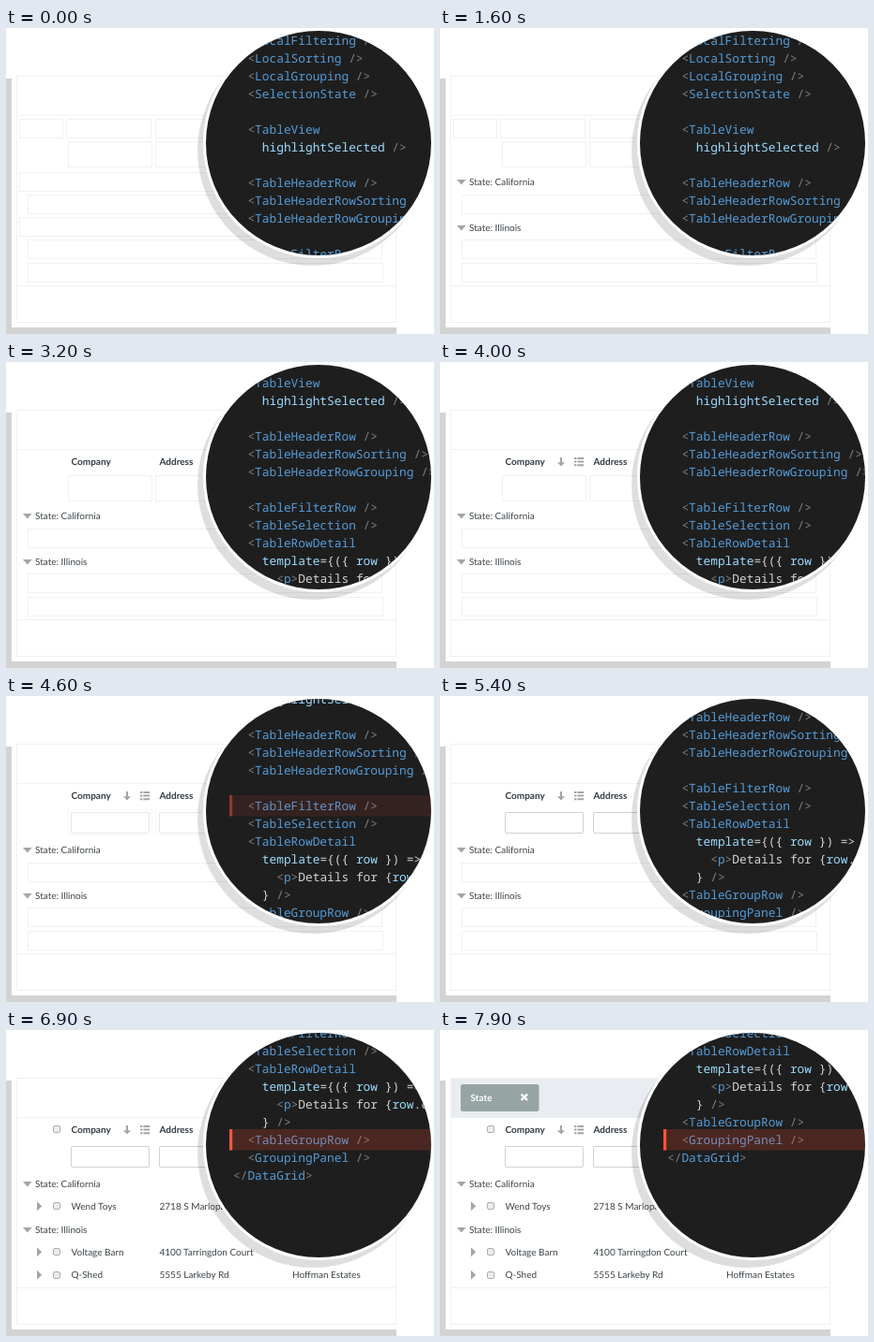
Write an HTML page that moves like this. It is 456x327 px and loops after 8 s.

```html
<!DOCTYPE html>
<html lang="en">
<head>
<meta charset="utf-8">
<title>Data grid features</title>
<style>
  html, body { margin: 0; width: 100%; height: 100%; overflow: hidden; background: #fff; }
  svg { display: block; }
  text { text-rendering: geometricPrecision; white-space: pre; }
  .ui text { font: 10px Lato, sans-serif; fill: #3d4449; }
  .ui .bold { font-weight: 700; fill: #333b42; }
  .ui .pill { fill: #fff; }
  .ghost { fill: none; stroke: #f1f1f1; }
  .back { fill: #fff; }
  .input { fill: #fff; stroke: #cfd1d3; }
  .check { fill: #ececec; stroke: #adadad; }
  .mark { fill: #a2a5a7; }
  .code text { font: 12.83px "Noto Sans Mono", monospace; fill: #d4d4d4; }
  .code .p { fill: #808080; }
  .code .t { fill: #569cd6; }
  .code .a { fill: #9cdcfe; }

  .show { animation: 8s step-end infinite; }
  .groups { animation-name: groups; }
  .heads { animation-name: heads; }
  .icons { animation-name: icons; }
  .filters { animation-name: filters; }
  .checks { animation-name: checks; }
  .rows { animation-name: rows; }
  .panel { animation-name: panel; }
  .glow { animation-name: glow; }
  .code { animation: scroll 8s infinite; }

  @keyframes groups { 0% { opacity: 0 } 12.5% { opacity: .5 } 13.75%, 100% { opacity: 1 } }
  @keyframes heads { 0% { opacity: 0 } 27.5% { opacity: .5 } 28.75%, 100% { opacity: 1 } }
  @keyframes icons { 0% { opacity: 0 } 42.5% { opacity: .5 } 43.75%, 100% { opacity: 1 } }
  @keyframes filters { 0% { opacity: 0 } 57.5% { opacity: .5 } 58.75%, 100% { opacity: 1 } }
  @keyframes checks { 0% { opacity: 0 } 70% { opacity: .5 } 71.25%, 100% { opacity: 1 } }
  @keyframes rows { 0% { opacity: 0 } 85% { opacity: .5 } 86.25%, 100% { opacity: 1 } }
  @keyframes panel { 0% { opacity: 0 } 97.5% { opacity: .5 } 98.75%, 100% { opacity: 1 } }

  @keyframes glow {
    0% { opacity: 0; transform: translateY(-9px) }
    12.5% { opacity: .5; transform: translateY(-9px) }
    13.75% { opacity: 1; transform: translateY(-9px) }
    20%, 35%, 50%, 65%, 77.5%, 92.5% { opacity: 0; transform: none }
    27.5%, 42.5%, 57.5%, 70%, 85%, 97.5% { opacity: .5; transform: none }
    28.75%, 43.75%, 58.75%, 71.25%, 86.25%, 98.75%, 100% { opacity: 1; transform: none }
  }

  @keyframes scroll {
    0%, 20% { transform: none; animation-timing-function: steps(4) }
    25%, 35% { transform: translateY(-48px); animation-timing-function: steps(4) }
    40%, 50% { transform: translateY(-86px); animation-timing-function: steps(4) }
    55%, 65% { transform: translateY(-124px); animation-timing-function: steps(2) }
    67.5%, 77.5% { transform: translateY(-143px); animation-timing-function: steps(4) }
    82.5%, 92.5% { transform: translateY(-238px); animation-timing-function: steps(2) }
    95%, 100% { transform: translateY(-257px) }
  }
</style>
</head>
<body>
<svg width="456" height="327" viewBox="0 0 456 327">
  <defs>
    <clipPath id="lens"><circle cx="333" cy="123" r="120"/></clipPath>
    <path id="open" class="mark" d="M18 162h9.6l-4.8 5.4z"/>
    <path id="closed" class="mark" d="M33 183.2v10l5.2-5z"/>
    <rect id="box" class="check" x="50.5" y="184.5" width="7" height="7" rx="1.5"/>
  </defs>

  <!-- card -->
  <path fill="#d3d3d3" d="M0 54h6v266h410v7H0z"/>
  <g class="ghost">
    <rect x="11.5" y="51.5" width="404" height="263"/>
    <path d="M12 93.5h403M12 275.5h403"/>
    <rect x="14.5" y="97.5" width="46" height="20"/>
    <rect x="64.5" y="97.5" width="90" height="20"/>
    <rect x="159.5" y="97.5" width="90" height="20"/>
    <rect x="66.5" y="121.5" width="89" height="27"/>
    <rect x="159.5" y="121.5" width="89" height="27"/>
    <rect x="14.5" y="154.5" width="387" height="20"/>
    <rect x="23.5" y="178.5" width="378" height="20"/>
    <rect x="14.5" y="202.5" width="387" height="20"/>
    <rect x="23.5" y="226.5" width="377" height="20"/>
    <rect x="23.5" y="251.5" width="378" height="20"/>
  </g>

  <g class="ui">
    <g class="show groups">
      <path class="back" d="M13 153h390v23H13zM13 201h390v23H13z"/>
      <use href="#open"/><text x="31" y="168">State: California</text>
      <use href="#open" y="49"/><text x="31" y="217">State: Illinois</text>
    </g>
    <g class="show heads">
      <path class="back" d="M13 96h238v23H13z"/>
      <text class="bold" x="69.5" y="110">Company</text>
      <text class="bold" x="163.5" y="110">Address</text>
    </g>
    <g class="show icons mark">
      <path d="M128 102h2v5.2h3l-4 4.3l-4-4.3h3z"/>
      <path d="M143 102h2.4v2H143zM146.4 102h6.8v2h-6.8zM143 105.6h2.4v2H143zM146.4 105.6h6.8v2h-6.8zM143 109.2h2.4v2H143zM146.4 109.2h6.8v2h-6.8z"/>
    </g>
    <g class="show filters">
      <path class="back" d="M65 120h186v30H65z"/>
      <rect class="input" x="69.5" y="124.5" width="83" height="22" rx="1.5"/>
      <rect class="input" x="163.5" y="124.5" width="83" height="22" rx="1.5"/>
    </g>
    <g class="show rows">
      <path class="back" d="M22 177h381v23H22zM22 225h381v48H22z"/>
      <use href="#closed"/>
      <text x="69.5" y="192">Wend Toys</text>
      <text x="163.5" y="192">2718 S Marlopa</text>
      <use href="#closed" y="49"/>
      <text x="69.5" y="241">Voltage Barn</text>
      <text x="163.5" y="241">4100 Tarringdon Court</text>
      <use href="#closed" y="73.5"/>
      <text x="69.5" y="265">Q-Shed</text>
      <text x="163.5" y="265">5555 Larkeby Rd</text>
      <text x="305" y="265">Hoffman Estates</text>
    </g>
    <g class="show checks">
      <use href="#box" y="-82"/>
      <use href="#box"/>
      <use href="#box" y="49"/>
      <use href="#box" y="74"/>
    </g>
    <g class="show panel">
      <path fill="#e9edf2" d="M12 52h403v42H12z"/>
      <rect x="22" y="58" width="83.5" height="29" rx="2.5" fill="#97a4a4"/>
      <text class="bold pill" x="32.5" y="76">State</text>
      <path d="M86.6 68.6l6.4 6.4m0-6.4l-6.4 6.4" stroke="#fff" stroke-width="2.4"/>
    </g>
  </g>

  <!-- magnifier -->
  <circle cx="327" cy="131" r="123" fill="#000" opacity=".13"/>
  <circle cx="333" cy="123" r="123" fill="#fff"/>
  <g clip-path="url(#lens)">
    <rect x="213" y="3" width="240" height="240" fill="#1e1e1e"/>
    <g class="code" id="code"></g>
    <g class="show glow">
      <rect x="241" y="106" width="212" height="22.5" fill="#ff4d32" opacity=".2"/>
      <rect x="238" y="106" width="3.2" height="22.5" fill="#fb5637"/>
    </g>
  </g>
</svg>
<script>
  const source = `  <LocalFiltering />
  <LocalSorting />
  <LocalGrouping />
  <SelectionState />

  <TableView
    highlightSelected />

  <TableHeaderRow />
  <TableHeaderRowSorting />
  <TableHeaderRowGrouping />

  <TableFilterRow />
  <TableSelection />
  <TableRowDetail
    template={({ row }) =>
      <p>Details for {row.city}</p>
    } />
  <TableGroupRow />
  <GroupingPanel />
</DataGrid>`;

  const NS = 'http://www.w3.org/2000/svg';
  const CHAR = 7.7, LINE = 19;
  const token = /=>|(<\/?|\/?>)|(?<=<\/?)(\w+)|\b(template|row|highlightSelected)\b|\w+|./g;

  function add(parent, tag, attrs, content = '') {
    const el = document.createElementNS(NS, tag);
    for (const key in attrs) el.setAttribute(key, attrs[key]);
    el.textContent = content;
    return parent.appendChild(el);
  }

  source.split('\n').forEach((line, i) => {
    const code = line.trimStart();
    const x = 242 + (line.length - code.length) * CHAR;
    const row = add(document.getElementById('code'), 'text', { x, y: 18 + i * LINE });
    for (const [word, punct, name, attr] of code.matchAll(token)) {
      add(row, 'tspan', { class: punct ? 'p' : name ? 't' : attr ? 'a' : '' }, word);
    }
  });
</script>
</body>
</html>
```
